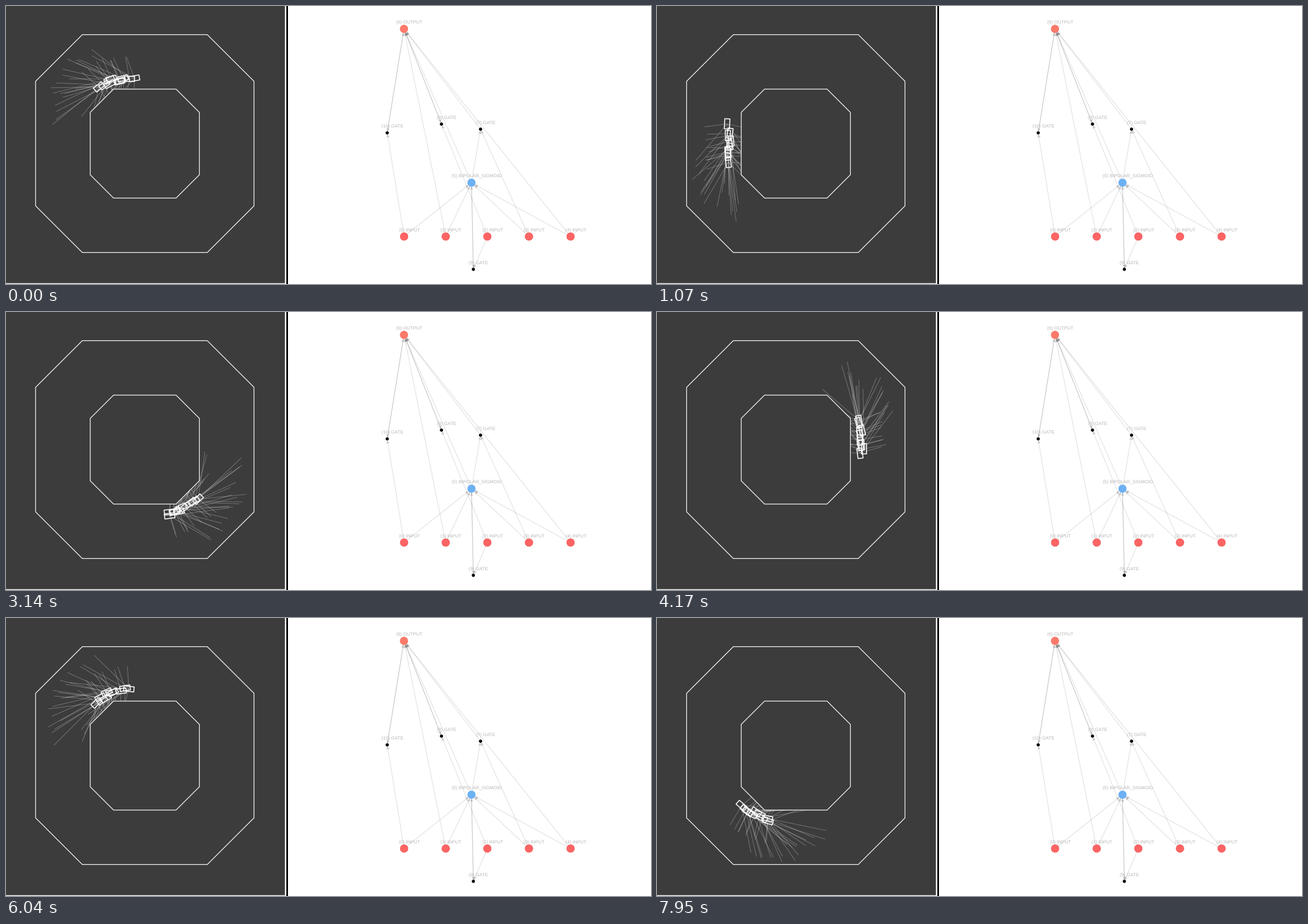
Write a matplotlib script that moves like this. It is 1139 by 492 pixels and loops after 8 s.

```python
import numpy as np
import matplotlib.pyplot as plt
from matplotlib.animation import FuncAnimation
from matplotlib.collections import LineCollection, PolyCollection
from matplotlib.patches import Circle, Polygon, Rectangle

W, H, DPI = 1139, 492, 64
FRAMES, INTERVAL = 200, 40
PT = 72 / DPI  # points per pixel

plt.rcParams["text.hinting"] = "none"
fig = plt.figure(figsize=(W / DPI, H / DPI), dpi=DPI, facecolor="white")
ax = fig.add_axes([0, 0, 1, 1])
ax.set(xlim=(0, W), ylim=(H, 0))
ax.axis("off")


def xy(z):
    z = np.asarray(z)
    return np.stack([z.real, z.imag], axis=-1)


def cross(a, b):
    return (np.conj(a) * b).imag


def octagon(center, half, side):
    """Corners as complex numbers, counterclockwise on screen from top right."""
    a, b = half, side
    corners = [(b, -a), (-b, -a), (-a, -b), (-a, b),
               (-b, a), (b, a), (a, b), (a, -b)]
    return np.array([center + complex(*c) for c in corners])


# ---------------------------------------------------------------- track
ax.add_patch(Rectangle((0, 0), 492.5, 490.6, fc="#3c3c3c", lw=0, snap=False))
ax.add_patch(Rectangle((495, 0), 3, H, fc="black", lw=0))

CENTER = 245.1 + 243.5j
INNER_HALF, INNER_SIDE = 96.4, 55.2
outer = octagon(CENTER, 192.8, 110.3)
inner = octagon(CENTER, INNER_HALF, INNER_SIDE)
for ring in (outer, inner):
    ax.add_patch(Polygon(xy(ring), fill=False, ec="white", lw=1.25 * PT))

wall_start = np.concatenate([outer, inner])
wall_step = np.concatenate([np.roll(outer, -1), np.roll(inner, -1)]) - wall_start


def racing_line(gap=21, window=90):
    """Rounded octagon around the inner wall."""
    pts = octagon(CENTER, INNER_HALF + gap,
                  INNER_SIDE + gap * np.tan(np.pi / 8))
    pts = np.append(pts, pts[0])
    arc = np.concatenate([[0], np.cumsum(abs(np.diff(pts)))])
    line = np.interp(np.arange(int(arc[-1])), arc, pts)
    n = len(line)
    kernel = np.ones(window) / window
    return np.convolve(np.tile(line, 3), kernel, "same")[n:2 * n]


line = racing_line()
LAP = len(line)
tangent = np.roll(line, -1) - np.roll(line, 1)
tangent /= abs(tangent)

# ---------------------------------------------------------------- cars
CARS = 10
LAP_TIME = 5960
SPEED = LAP / LAP_TIME
START = 122  # pack centre along the line at time zero

rng = np.random.default_rng(11)
slot = np.linspace(31, -31, CARS)
drift_phase, steer_phase = rng.uniform(0, 2 * np.pi, (2, CARS))
drift_rate = rng.uniform(0.001, 0.002, CARS)
steer_rate = rng.uniform(0.004, 0.007, CARS)
swing = rng.uniform(2.5, 5.5, CARS)

BODY = np.array([-9 - 4.5j, 9 - 4.5j, 9 + 4.5j, -9 + 4.5j])
SENSORS = (np.array([40, 85, 106, 85, 40])
           * np.exp(1j * np.radians([-80, -38, 0, 38, 80])))


def pack_at(t):
    """Position and unit heading of every car: a spread pack, each weaving."""
    s = START + SPEED * t
    s -= 6 * np.cos(4 * np.pi * (s - START) / LAP)
    s = s + slot + 5 * np.sin(drift_rate * t + drift_phase)
    base = np.interp(s, np.arange(LAP), line, period=LAP)
    along = np.interp(s, np.arange(LAP), tangent, period=LAP)
    along /= abs(along)
    steer = steer_rate * t + steer_phase
    offset = swing * np.sin(steer)
    slide = swing * steer_rate * np.cos(steer)
    heading = along * (SPEED + 1j * slide)
    return base + 1j * offset * along, heading / abs(heading)


def cast(pos, heading):
    """Sensor rays, cut where they first meet a wall."""
    ray = heading[:, None] * SENSORS
    d = ray[..., None]
    to_wall = wall_start - pos[:, None, None]
    det = cross(d, wall_step)
    u = cross(to_wall, wall_step) / det
    v = cross(to_wall, d) / det
    hit = (u > 0) & (u < 1) & (v >= 0) & (v <= 1)
    reach = np.where(hit, u, 1).min(axis=-1)
    start = np.broadcast_to(pos[:, None], ray.shape)
    return np.stack([start, start + ray * reach], axis=-1).reshape(-1, 2)


rays = LineCollection([], colors=(1, 1, 1, 0.34), linewidths=0.85 * PT)
bodies = PolyCollection([], facecolors="none", edgecolors="white",
                        linewidths=1.6 * PT)
ax.add_collection(rays, autolim=False)
ax.add_collection(bodies, autolim=False)

# ---------------------------------------------------------------- network
RED, CORAL, BLUE = "#ff6464", "#fb7969", "#6cb1f4"
INPUTS = {i: (703 + 73.5 * i, 408, f"({i}) INPUT", RED) for i in range(5)}
NODES = {
    **INPUTS,
    5: (822, 312.7, "(5) BIPOLAR_SIGMOID", BLUE),
    6: (702.8, 40.5, "(6) OUTPUT", CORAL),
    7: (838, 218, "(7) GATE", "black"),
    8: (769, 209, "(8) GATE", "black"),
    9: (825.3, 466, "(9) GATE", "black"),
    10: (673.2, 224.5, "(10) GATE", "black"),
}
EDGES = [(0, 5), (1, 5), (3, 5), (4, 5), (0, 10), (1, 6), (2, 8), (2, 9),
         (3, 7), (4, 6), (5, 6), (5, 7), (7, 6), (5, 9), (9, 5),
         (6, 8), (8, 6), (6, 10), (10, 6)]


def radius(key):
    return 2.6 if NODES[key][3] == "black" else 7.0


def draw_edge(a, b):
    p, q = complex(*NODES[a][:2]), complex(*NODES[b][:2])
    unit = (q - p) / abs(q - p)
    tip = q - unit * radius(b)
    back = tip - unit * 6
    ax.plot([p.real, tip.real], [p.imag, tip.imag], color="black",
            alpha=0.125, lw=1.1 * PT, solid_capstyle="butt", zorder=1)
    head = [tip, back + 2.8j * unit, back + 1.2 * unit, back - 2.8j * unit]
    ax.add_patch(Polygon(xy(head), fc="black", alpha=0.18, lw=0, zorder=1))


for edge in EDGES:
    draw_edge(*edge)
for key, (x, y, label, color) in NODES.items():
    rim = "#ee5555" if color == RED else color
    ax.add_patch(Circle((x, y), radius(key) - 0.2, fc=color, ec=rim,
                        lw=0.8 * PT, zorder=3))
    ax.text(x + 9.3, y - 9, label, color="#b8b8b8", fontsize=8.3 * PT,
            family="Liberation Sans", ha="center", va="baseline", zorder=4)


def update(frame):
    pos, heading = pack_at(frame * INTERVAL + 10)
    rays.set_segments(xy(cast(pos, heading)))
    bodies.set_verts(xy(pos[:, None] + heading[:, None] * BODY))
    return rays, bodies


anim = FuncAnimation(fig, update, frames=FRAMES, interval=INTERVAL,
                     repeat=True, repeat_delay=0, blit=False)
plt.show()
```
